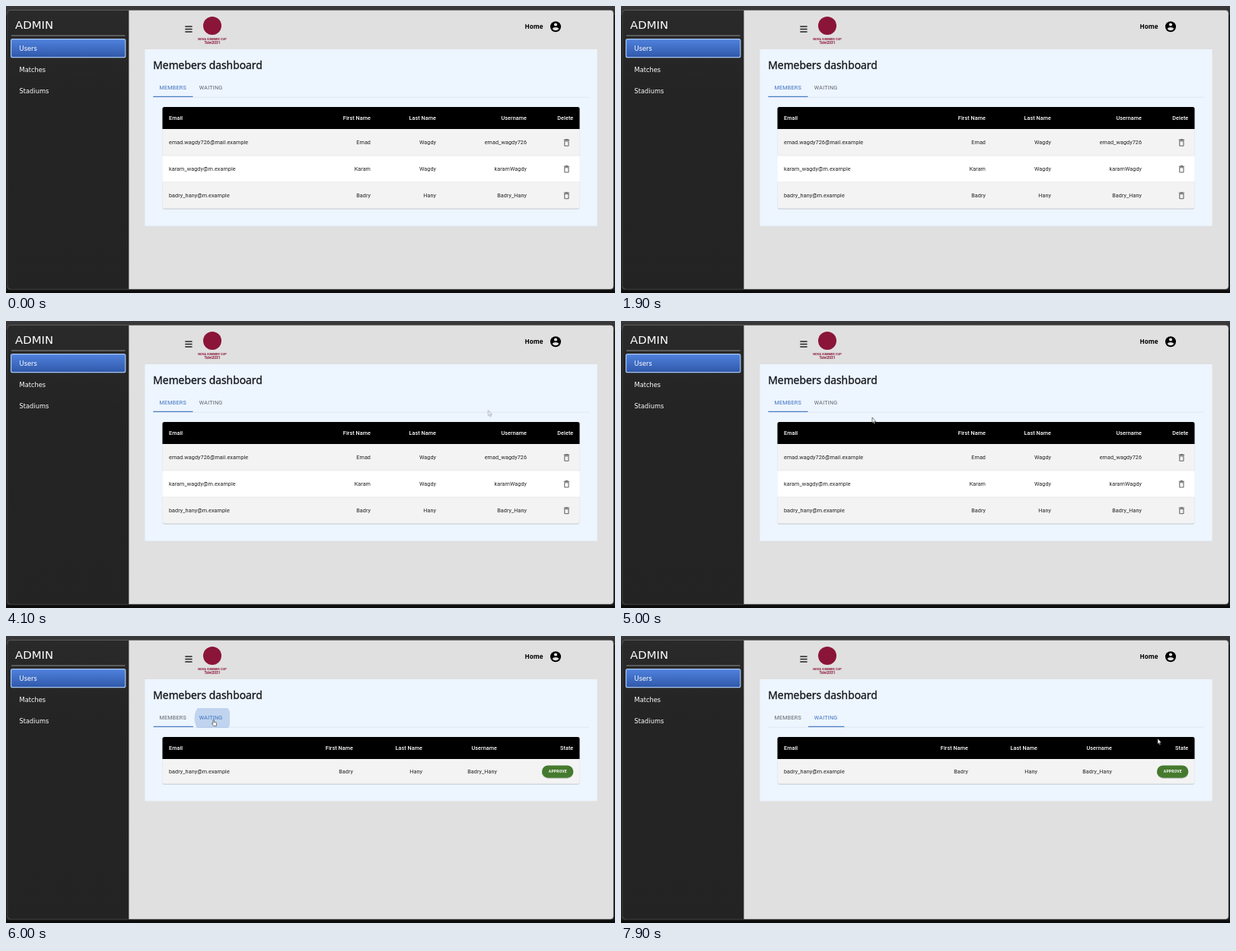
Recreate the animation shown at these times as an HTML page. Size 800 by 378 pixels, loop 8000 ms.

```html
<!DOCTYPE html>
<html lang="en">
<head>
<meta charset="utf-8">
<title>Admin dashboard</title>
<style>
html, body { margin: 0; height: 100%; overflow: hidden; background: #1b1b1b; }
svg { display: block; width: 100vw; height: 100vh; }

.side { font: 8.25px "DejaVu Sans", sans-serif; fill: #fff; }
.brand { font-size: 14.9px; }
.title { font: 13.85px "Noto Sans", sans-serif; fill: #111418; stroke: #111418; stroke-width: .3px; }
.home { font: 700 8.2px "Noto Sans", sans-serif; }
.logo { font: 700 4px Roboto, sans-serif; fill: #8a1538; text-anchor: middle; }
.tab { font: 7.2px Roboto, sans-serif; letter-spacing: .22px; }
.cells { font: 7.2px Roboto, sans-serif; letter-spacing: .08px; fill: #222; }
.cells .head { font-weight: 500; fill: #fff; }
.end { text-anchor: end; }
.approve { font: 700 5px Roboto, sans-serif; letter-spacing: .2px; fill: #fff; text-anchor: middle; }

/* One loop is 8 s, so 1.25% is one 100 ms step. */
.members, .waiting, .tab, .bar, .ripple, .cursor, .arrow, .hand {
  animation: 8s step-end infinite;
}
.members { animation-name: leave; }
.waiting { animation-name: enter; }
.tab.first { animation-name: deselect; }
.tab.second { animation-name: select; }
.bar { animation-name: slide; }
.ripple { animation-name: ripple; }
.cursor { animation-name: travel; }
.arrow { animation-name: arrow; }
.hand { animation-name: hand; }

@keyframes leave { 0% { visibility: visible } 75%, 100% { visibility: hidden } }
@keyframes enter { 0% { visibility: hidden } 75%, 100% { visibility: visible } }
@keyframes deselect { 0% { fill: #3b70bd } 75%, 100% { fill: #5f6369 } }
@keyframes select { 0% { fill: #5f6369 } 75%, 100% { fill: #3b70bd } }
@keyframes slide {
  0% { x: 193.3px; width: 52.2px }
  75% { x: 193.7px; width: 52.2px }
  76.25% { x: 217px; width: 50px }
  77.5% { x: 240px; width: 48px }
  78.75%, 100% { x: 246px; width: 47.3px }
}
@keyframes ripple {
  0% { opacity: 0; fill: #5f6369; r: 14px }
  73.75% { opacity: .22; fill: #5f6369; r: 14px }
  75% { opacity: .25; fill: #3b70bd; r: 24px; animation-timing-function: steps(6) }
  82.5%, 100% { opacity: 0; fill: #3b70bd; r: 32px }
}
@keyframes travel {
  0% { opacity: 0; transform: translate(633.5px, 117.5px) }
  51.25% { opacity: .5; transform: translate(633.5px, 117.5px) }
  52.5% { opacity: 1; transform: translate(540px, 149px) }
  53.75% { opacity: 1; transform: translate(470px, 171px) }
  57.5% { opacity: 1; transform: translate(470px, 171px); animation-timing-function: steps(4) }
  62.5% { opacity: 1; transform: translate(330px, 127px); animation-timing-function: steps(5) }
  68.75% { opacity: 1; transform: translate(272px, 110px) }
  81.25% { opacity: 1; transform: translate(272px, 110px); animation-timing-function: steps(3) }
  85% { opacity: 1; transform: translate(470px, 126px); animation-timing-function: steps(2) }
  87.5% { opacity: 1; transform: translate(591px, 136px) }
  96.25% { opacity: 1; transform: translate(622px, 124px) }
  97.5% { opacity: 1; transform: translate(672px, 116px) }
  98.75%, 100% { opacity: 1; transform: translate(705px, 135px) }
}
@keyframes arrow {
  0% { visibility: visible }
  66.25% { visibility: hidden }
  82.5%, 100% { visibility: visible }
}
@keyframes hand {
  0% { visibility: hidden }
  66.25% { visibility: visible }
  82.5%, 100% { visibility: hidden }
}
</style>
</head>
<body>
<svg viewBox="0 0 800 378" preserveAspectRatio="none">
  <defs>
    <linearGradient id="topbar" x2="0" y2="1">
      <stop stop-color="#3a3a3c"/><stop offset="1" stop-color="#2e2e30"/>
    </linearGradient>
    <linearGradient id="sidebar" x2="0" y2="1">
      <stop stop-color="#2a2a2a"/><stop offset=".3" stop-color="#242424"/><stop offset="1" stop-color="#232323"/>
    </linearGradient>
    <linearGradient id="active" x2="0" y2="1">
      <stop stop-color="#5082de"/><stop offset="1" stop-color="#2f58a9"/>
    </linearGradient>
    <clipPath id="window"><rect x="2" y="5.5" width="796" height="367.5" rx="4"/></clipPath>
    <clipPath id="tabClip"><rect x="246" y="95" width="47.3" height="25.3"/></clipPath>
    <filter id="shadow" x="-5%" y="-5%" width="110%" height="115%">
      <feDropShadow dx="0" dy=".8" stdDeviation=".7" flood-opacity=".3"/>
    </filter>
    <path id="bin" fill="#626262" transform="scale(.52)"
      d="M-6 7c0 1.1.9 2 2 2h8c1.1 0 2-.9 2-2V-5H-6zM-4-3h8V7h-8zM3.5-8l-1-1h-5l-1 1H-7v2H7v-2z"/>
  </defs>

  <rect width="800" height="378" fill="#1b1b1b"/>
  <rect width="800" height="12" fill="url(#topbar)"/>
  <rect y="374.5" width="800" height="3.5" fill="#0c0c0c"/>

  <g clip-path="url(#window)">
    <rect width="800" height="378" fill="#e0e0e0"/>
    <rect width="161.4" height="378" fill="url(#sidebar)"/>
  </g>
  <rect x="1.8" y="5.3" width="796.4" height="367.9" rx="4" fill="none" stroke="#555" stroke-width=".6"/>

  <g class="side">
    <text class="brand" x="12" y="30.3">ADMIN</text>
    <path d="M7 39H156.5" stroke="#8c8c8c"/>
    <rect x="6.6" y="43.6" width="150.2" height="24.1" rx="2" fill="url(#active)" stroke="#a9c6f2" stroke-width="1.2"/>
    <text x="17.6" y="59">Users</text>
    <text x="17.6" y="87">Matches</text>
    <text x="17.6" y="115">Stadiums</text>
  </g>

  <path d="M235.3 27h9.3m-9.3 3.5h9.3m-9.3 3.5h9.3" stroke="#222" stroke-width="1.3"/>
  <circle cx="271" cy="26" r="12" fill="#8a1538"/>
  <g class="logo">
    <text x="271" y="45.2">NOVA SUMMER CUP</text>
    <text x="271" y="49.6" style="font-size:4.8px">Tolvi2031</text>
  </g>
  <text class="home" x="681.5" y="30.4">Home</text>
  <g transform="translate(713.6 18.9) scale(.7)">
    <circle cx="12" cy="12" r="10"/>
    <circle cx="12" cy="8" r="3" fill="#e0e0e0"/>
    <path d="M6 16c0-2 4-3.1 6-3.1s6 1.1 6 3.1a7.2 7.2 0 0 1-12 0z" fill="#e0e0e0"/>
  </g>

  <g class="members">
    <rect x="182.5" y="57" width="594" height="232.7" fill="#edf5ff"/>
    <rect x="205.5" y="133" width="548" height="133.5" rx="2.5" fill="#f3f3f3" filter="url(#shadow)"/>
    <path d="M205.5 162V135.5q0-2.5 2.5-2.5h543q2.5 0 2.5 2.5V162z"/>
    <rect x="205.5" y="197" width="548" height="35" fill="#fff"/>
    <path d="M205.5 197h548m-548 35h548" stroke="#e0e0e0" stroke-width=".6"/>
    <g class="cells">
      <g class="head">
        <text x="214" y="150.2">Email</text>
        <g class="end">
          <text x="479" y="150.2">First Name</text>
          <text x="565" y="150.2">Last Name</text>
          <text x="684" y="150.2">Username</text>
          <text x="745.3" y="150.2">Delete</text>
        </g>
      </g>
      <text x="214" y="182.3">emad.wagdy726@mail.example</text>
      <text x="214" y="217">karam_wagdy@m.example</text>
      <text x="214" y="252">badry_hany@m.example</text>
      <g class="end">
        <text x="479" y="182.3">Emad</text>
        <text x="565" y="182.3">Wagdy</text>
        <text x="684" y="182.3">emad_wagdy726</text>
        <text x="479" y="217">Karam</text>
        <text x="565" y="217">Wagdy</text>
        <text x="684" y="217">karamWagdy</text>
        <text x="479" y="252">Badry</text>
        <text x="565" y="252">Hany</text>
        <text x="684" y="252">Badry_Hany</text>
      </g>
    </g>
    <use href="#bin" x="736.4" y="180"/>
    <use href="#bin" x="736.4" y="214.8"/>
    <use href="#bin" x="736.4" y="249.6"/>
  </g>

  <g class="waiting">
    <rect x="182.5" y="57" width="594" height="160.3" fill="#edf5ff"/>
    <rect x="205.5" y="133" width="548" height="61.5" rx="2.5" fill="#f3f3f3" filter="url(#shadow)"/>
    <path d="M205.5 162V135.5q0-2.5 2.5-2.5h543q2.5 0 2.5 2.5V162z"/>
    <g class="cells">
      <g class="head">
        <text x="214" y="150.2">Email</text>
        <g class="end">
          <text x="456" y="150.2">First Name</text>
          <text x="547" y="150.2">Last Name</text>
          <text x="645" y="150.2">Username</text>
          <text x="745.3" y="150.2">State</text>
        </g>
      </g>
      <text x="214" y="181">badry_hany@m.example</text>
      <g class="end">
        <text x="456" y="181">Badry</text>
        <text x="547" y="181">Hany</text>
        <text x="645" y="181">Badry_Hany</text>
      </g>
    </g>
    <rect x="704" y="170.5" width="41.3" height="16.2" rx="8.1" fill="#447a2e" filter="url(#shadow)"/>
    <text class="approve" x="724.8" y="180.4">APPROVE</text>
  </g>

  <text class="title" x="193.3" y="83">Memebers dashboard</text>
  <path d="M193.3 120.2H766" stroke="#d8e1ec" stroke-width=".7"/>
  <text class="tab first" x="201.5" y="110">MEMBERS</text>
  <text class="tab second" x="253.8" y="110">WAITING</text>
  <g clip-path="url(#tabClip)"><circle class="ripple" cx="271.5" cy="108.5" r="14"/></g>
  <rect class="bar" x="193.3" y="118.8" width="52.2" height="1.1" fill="#3b70bd"/>

  <g class="cursor" fill="#fff" stroke="#222" stroke-width=".6" stroke-linejoin="round">
    <path class="arrow" d="M0 0V7.3L1.6 5.9 2.7 8.5 3.8 8 2.7 5.5H4.9z"/>
    <path class="hand" d="M0 .7Q.7-.3 1.4.7V3.4L4 4Q4.8 4.3 4.7 5.2L4.2 8.6H.9L-1.6 5.4Q-1.4 4.5-.6 5L0 5.5z"/>
  </g>
</svg>
</body>
</html>
```
